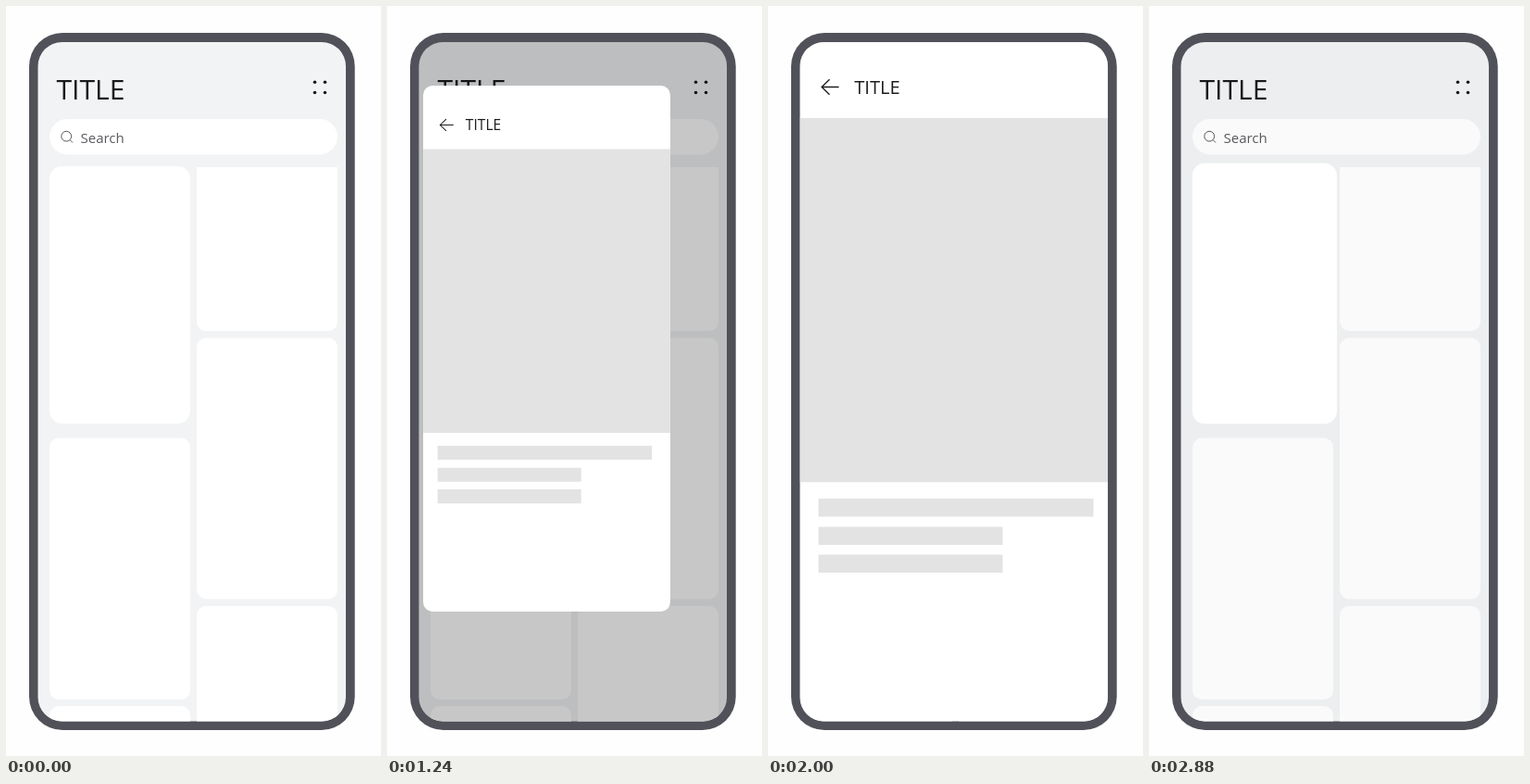
An HTML page with a canvas for the animation above (5080 ms loop, 405 px wide and 810 px high).

```html
<!DOCTYPE html>
<html lang="en">
<head>
<meta charset="utf-8">
<title>Card transition</title>
<style>
html, body { margin: 0; width: 100%; height: 100%; overflow: hidden; background: #fefefe; }
canvas { display: block; width: 405px; height: 810px; }
</style>
</head>
<body>
<canvas id="stage"></canvas>
<script>
const W = 405, H = 810, LOOP = 5080, STEP = 40;
const OPEN = 1078, CLOSE = 2570, CLOSE_END = 2880;
const SCREEN = { l: 34.5, t: 39, r: 367, b: 772.5 };
const CARD = { l: 47, t: 173, r: 199, b: 451 };
const FONT = '"Open Sans", "Noto Sans", sans-serif';

const canvas = document.getElementById('stage');
const ctx = canvas.getContext('2d');
const dpr = window.devicePixelRatio || 1;
canvas.width = W * dpr;
canvas.height = H * dpr;

const clamp = v => Math.max(0, Math.min(1, v));
const mix = (a, b, p) => a + (b - a) * p;

// Critically damped spring from 0 to 1; ms and stiffness in 1/s
function spring(ms, w) {
  const x = Math.max(0, ms) * w / 1000;
  return 1 - (1 + x) * Math.exp(-x);
}

function roundPath(l, t, r, b, radius) {
  ctx.beginPath();
  ctx.roundRect(l, t, r - l, b - t, radius);
}

function box(l, t, r, b, radius, color) {
  roundPath(l, t, r, b, radius);
  ctx.fillStyle = color;
  ctx.fill();
}

function disc(x, y, r, color) {
  ctx.beginPath();
  ctx.arc(x, y, r, 0, Math.PI * 2);
  ctx.fillStyle = color;
  ctx.fill();
}

function label(str, x, y, size, weight, color) {
  ctx.font = `${weight} ${size}px ${FONT}`;
  ctx.fillStyle = color;
  ctx.fillText(str, x, y);
}

function drawList() {
  label('TITLE', 54.5, 100.5, 30, 500, '#18191b');
  for (const x of [333.5, 344.5])
    for (const y of [82.3, 93.5]) disc(x, y, 1.8, '#18191b');

  box(47, 122, 358, 160.5, 19.25, '#fff');
  ctx.strokeStyle = '#55565a';
  ctx.lineWidth = 1;
  ctx.beginPath();
  ctx.arc(65.2, 140.7, 5.4, 0, Math.PI * 2);
  ctx.moveTo(69.1, 144.6);
  ctx.lineTo(72, 147.5);
  ctx.stroke();
  label('Search', 80.5, 147.7, 15, 400, '#5a5b5e');

  box(CARD.l, CARD.t, CARD.r, CARD.b, 14, '#fff');
  box(47, 466.5, 199, 749, 10, '#fff');
  box(47, 756, 199, 800, 10, '#fff');
  box(206, 174, 358, 351, [0, 0, 10, 10], '#fff');
  box(206, 358.5, 358, 640.5, 10, '#fff');
  box(206, 648, 358, 800, 10, '#fff');
}

function drawDetail() {
  // The image area runs on past both sides and is cut by the page
  box(-200, 82, 600, 475.3, 0, '#e3e3e3');
  box(20, 493, 317, 512.5, 0, '#e3e3e3');
  box(20, 523.5, 219, 543, 0, '#e3e3e3');
  box(20, 553.5, 219, 573, 0, '#e3e3e3');

  ctx.strokeStyle = '#1d1d1f';
  ctx.lineWidth = 1.3;
  ctx.beginPath();
  ctx.moveTo(42, 48.5);
  ctx.lineTo(23.5, 48.5);
  ctx.moveTo(32, 40.2);
  ctx.lineTo(23.5, 48.5);
  ctx.lineTo(32, 56.8);
  ctx.stroke();
  label('TITLE', 58.8, 56, 20, 500, '#1d1d1f');
}

function openPose(t) {
  const p = spring(t - OPEN, 13.36);
  const lift = 55 * p * (1 - p) ** 3;
  const lag = 0.25 * p ** 3 * (1 - p);
  const l = mix(CARD.l, SCREEN.l, p), r = mix(CARD.r, SCREEN.r, p);
  const top = mix(CARD.t, SCREEN.t, p) - lift;
  return {
    l, r, t: top,
    b: mix(CARD.b, SCREEN.b, p) - lift,
    radius: mix(14, 8, p),
    x: l, y: top + 200 * lag,
    scale: (r - l) / (SCREEN.r - SCREEN.l) - lag,
    alpha: clamp((t - OPEN) / 145),
    dim: 0.22 * clamp((t - 1040) / 160)
  };
}

function closePose(t) {
  const p = spring(t - CLOSE, 18.2);
  const arc = p * (1 - p) ** 2;
  return {
    l: mix(SCREEN.l, CARD.l, p) - 59 * arc,
    r: mix(SCREEN.r, CARD.r, p) - 59 * arc,
    t: mix(SCREEN.t, CARD.t, p) - 102 * arc,
    b: mix(SCREEN.b, CARD.b, Math.min(1, p * 1.023)) - 92 * arc,
    radius: mix(8, 14, p),
    x: SCREEN.l - 68 * p, y: SCREEN.t + 63 * p,
    scale: 1,
    alpha: clamp(1 - 2 * p),
    dim: 0.22 * clamp((2900 - t) / 240)
  };
}

function drawPage(pose) {
  ctx.fillStyle = `rgba(0,0,0,${pose.dim})`;
  ctx.fillRect(0, 0, W, H);
  ctx.save();
  box(pose.l, pose.t, pose.r, pose.b, pose.radius, '#fff');
  ctx.clip();
  ctx.translate(pose.x, pose.y);
  ctx.scale(pose.scale, pose.scale);
  ctx.globalAlpha = pose.alpha;
  if (pose.alpha > 0) drawDetail();
  ctx.restore();
}

function drawTap(x, y, u) {
  if (u < 0 || u >= 360) return;
  const alpha = Math.min(0.31 + u / 200, 0.8, 0.67 + (240 - u) / 180);
  const scale = 1 - 0.125 * Math.min(1, u / 240);
  ctx.beginPath();
  ctx.arc(x, y, 30 * scale, 0, Math.PI * 2);
  ctx.lineWidth = 12 * scale;
  ctx.strokeStyle = `rgba(16,223,197,${clamp(alpha)})`;
  ctx.stroke();
}

function render(t) {
  ctx.setTransform(dpr, 0, 0, dpr, 0, 0);
  ctx.fillStyle = '#fefefe';
  ctx.fillRect(0, 0, W, H);
  box(25, 29, 376.7, 782, 36, '#505159');

  ctx.save();
  roundPath(SCREEN.l, SCREEN.t, SCREEN.r, SCREEN.b, 26);
  ctx.clip();
  ctx.fillStyle = '#f2f3f5';
  ctx.fillRect(0, 0, W, H);
  drawList();
  if (t >= 1040) drawPage(t < 2400 ? openPose(t) : closePose(Math.min(t, CLOSE_END)));
  drawTap(120.3, 299.3, t - 680);
  drawTap(67.3, 87.3, t - 2400);
  ctx.restore();
}

const start = performance.now();
function tick() {
  const t = (performance.now() - start) % LOOP;
  render(Math.floor(t / STEP) * STEP);
  requestAnimationFrame(tick);
}
tick();
</script>
</body>
</html>
```
